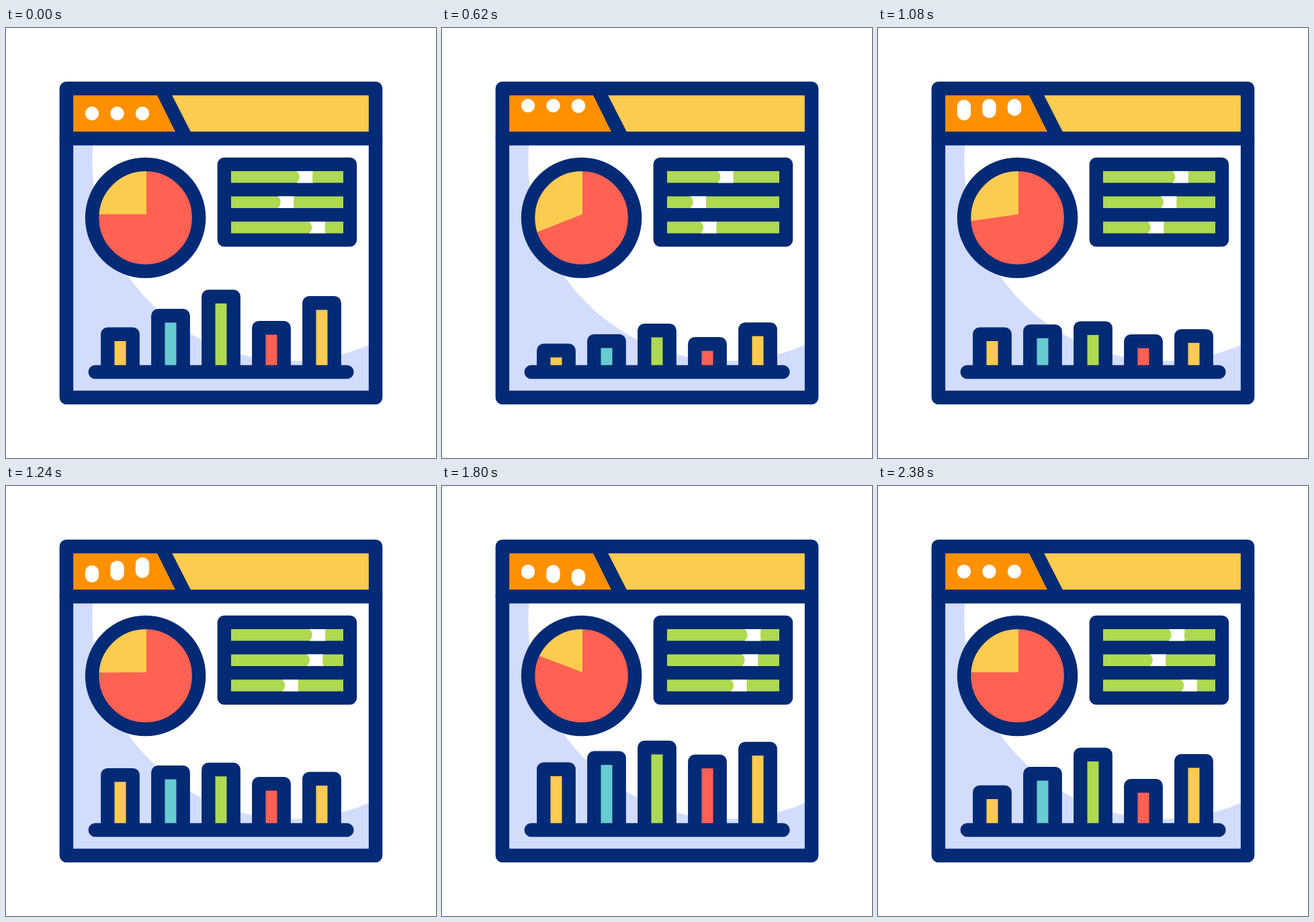
An HTML page with a canvas for the animation above (2.42 s loop, 640 by 640 pixels).

```html
<!DOCTYPE html>
<html lang="en">
<head>
<meta charset="utf-8">
<title>Dashboard</title>
<style>
html, body { margin: 0; width: 100%; height: 100%; overflow: hidden; background: #fff; }
canvas { display: block; }
</style>
</head>
<body>
<canvas id="stage" width="640" height="640"></canvas>
<script>
const ctx = document.getElementById('stage').getContext('2d');
const LOOP = 2420, STEP = 20, LINE = 20.5;
const NAVY = '#032a75', YELLOW = '#fdcb50', ORANGE = '#ff9100', RED = '#ff6152',
      GREEN = '#afd951', TEAL = '#67cbd0', LAVENDER = '#d2dcfd', WHITE = '#fff';

// Heights at rest, at the low point and at the high point.
const BAR_TIMES = [10, 790, 1515, 2255], BAR_DELAY = 33;
const BARS = [
  { color: YELLOW, rest: 56.5, low: 28.8, high: 107.5 },
  { color: TEAL, rest: 84, low: 38.5, high: 116 },
  { color: GREEN, rest: 112.5, low: 47.9, high: 125.8 },
  { color: RED, rest: 66, low: 32.8, high: 109 },
  { color: YELLOW, rest: 103, low: 44.2, high: 123.5 }
];

const SLIDERS = [
  { times: [0, 620, 1500, 2190], stops: [456.5, 434, 486.5, 456.5] },
  { times: [33, 650, 1500, 2235], stops: [428.5, 393.2, 494.3, 428.5] },
  { times: [20, 660, 1500, 2270], stops: [475, 408, 443, 475] }
];

const DOT_DELAY = 85;
const DOT_STOPS = [0, -11.6, -11.6, 11, 11, 0];
const DOT_TOP_TIMES = [0, 230, 1020, 1430, 1540, 1740];
const DOT_BOTTOM_TIMES = [130, 500, 654, 1490, 1640, 1830];

// Eased value at time t along a list of stops.
function track(t, times, stops) {
  if (t <= times[0]) return stops[0];
  for (let i = 1; i < times.length; i++) {
    if (t < times[i]) {
      const u = (t - times[i - 1]) / (times[i] - times[i - 1]);
      return stops[i - 1] + (stops[i] - stops[i - 1]) * u * u * (3 - 2 * u);
    }
  }
  return stops[stops.length - 1];
}

function rect(x, y, w, h, color) {
  ctx.fillStyle = color;
  ctx.fillRect(x, y, w, h);
}

function disc(x, y, r, color) {
  ctx.fillStyle = color;
  ctx.beginPath();
  ctx.arc(x, y, r, 0, Math.PI * 2);
  ctx.fill();
}

function polygon(points, color) {
  ctx.fillStyle = color;
  ctx.beginPath();
  points.forEach(([x, y]) => ctx.lineTo(x, y));
  ctx.fill();
}

function strokeLine(x1, y1, x2, y2) {
  ctx.beginPath();
  ctx.moveTo(x1, y1);
  ctx.lineTo(x2, y2);
  ctx.stroke();
}

function drawWindow() {
  rect(90, 90, 460, 460, LAVENDER);
  ctx.save();
  ctx.beginPath();
  ctx.rect(90, 164, 460, 386);
  ctx.clip();
  disc(424, 200, 295.6, WHITE);
  ctx.restore();
  rect(90, 90, 460, 75, YELLOW);
  polygon([[90, 90], [231, 90], [268, 165], [90, 165]], ORANGE);
  polygon([[220, 90], [242, 90], [280, 164.5], [257, 164.5]], NAVY);
  ctx.strokeRect(89.9, 89.9, 460.2, 460.2);
  strokeLine(89.9, 164.6, 550.1, 164.6);
}

function drawDots(t) {
  for (let i = 0; i < 3; i++) {
    const local = t - i * DOT_DELAY;
    const top = 117 + track(local, DOT_TOP_TIMES, DOT_STOPS);
    const bottom = 137.4 + track(local, DOT_BOTTOM_TIMES, DOT_STOPS);
    ctx.fillStyle = WHITE;
    ctx.beginPath();
    ctx.roundRect(117.8 + i * 37.5, top, 20.4, bottom - top, 10.2);
    ctx.fill();
  }
}

function drawPie(t) {
  const x = 207.6, y = 282.5, r = 79.5;
  const tilt = track(t, [0, 605, 1885, 2345], [0, 21.4, -21.4, 0]) * Math.PI / 180;
  disc(x, y, r, RED);
  ctx.save();
  ctx.beginPath();
  ctx.arc(x, y, r, 0, Math.PI * 2);
  ctx.clip();
  ctx.fillStyle = YELLOW;
  ctx.beginPath();
  ctx.moveTo(209, 277.3);
  ctx.arc(209, 277.3, 120, Math.PI - tilt, Math.PI * 1.5);
  ctx.fill();
  ctx.restore();
  ctx.beginPath();
  ctx.arc(x, y, r, 0, Math.PI * 2);
  ctx.stroke();
}

function drawSliders(t) {
  ctx.fillStyle = NAVY;
  ctx.beginPath();
  ctx.roundRect(314.6, 192.7, 207.6, 132.8, 10.2);
  ctx.fill();
  SLIDERS.forEach(({ times, stops }, i) => {
    const y = 213 + i * 37.6, h = 17.4;
    const right = track(t, times, stops), left = right - 23.7;
    rect(335, y, 167, h, GREEN);
    ctx.fillStyle = WHITE;
    ctx.beginPath();
    ctx.moveTo(left, y);
    ctx.lineTo(right, y);
    ctx.quadraticCurveTo(right - 1, y + h / 2, right, y + h);
    ctx.lineTo(left, y + h);
    ctx.quadraticCurveTo(left + 8, y + h / 2, left, y);
    ctx.fill();
  });
}

function drawBars(t) {
  BARS.forEach(({ color, rest, low, high }, i) => {
    const height = track(t - i * BAR_DELAY, BAR_TIMES, [rest, low, high, rest]);
    const x = 170 + i * 75, top = 502 - height;
    ctx.fillStyle = NAVY;
    ctx.beginPath();
    ctx.roundRect(x - 28.9, top, 57.8, 512 - top, [10.2, 10.2, 0, 0]);
    ctx.fill();
    rect(x - 8.5, top + LINE, 17, height - LINE, color);
  });
  strokeLine(132.8, 512, 507.4, 512);
}

function draw(now) {
  const t = Math.floor((now % LOOP) / STEP) * STEP;
  rect(0, 0, 640, 640, WHITE);
  ctx.strokeStyle = NAVY;
  ctx.lineWidth = LINE;
  ctx.lineCap = ctx.lineJoin = 'round';
  drawWindow();
  drawDots(t);
  drawPie(t);
  drawSliders(t);
  drawBars(t);
}

const start = performance.now();
function loop() {
  draw(performance.now() - start);
  requestAnimationFrame(loop);
}
loop();
</script>
</body>
</html>
```
